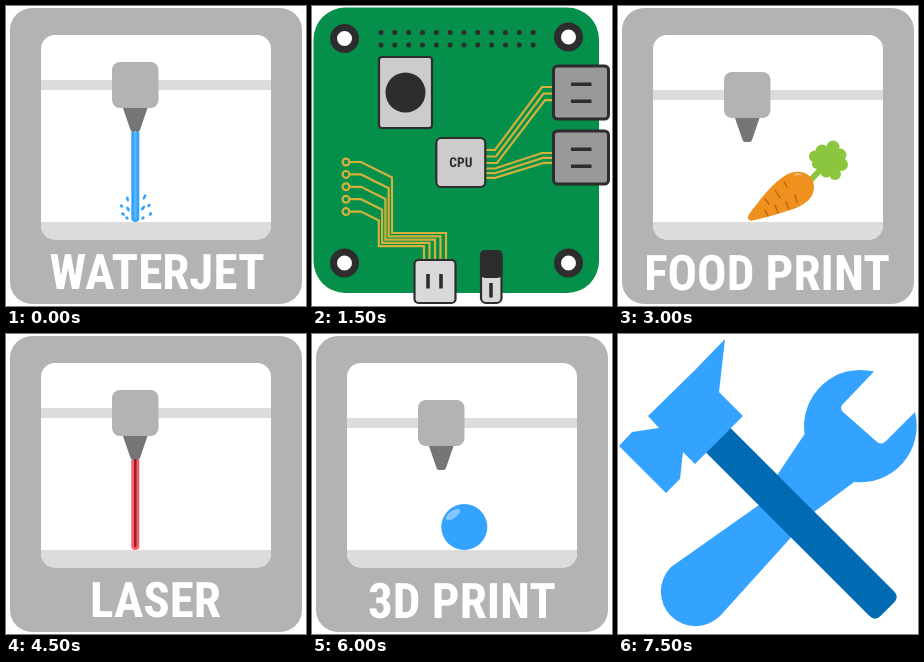
An HTML page that plays this animation: 300x300 px, repeating every 9 s.

```html
<!DOCTYPE html>
<html lang="en">
<head>
<meta charset="utf-8">
<title>Workshop signs</title>
<style>
  html, body { margin: 0; width: 100%; height: 100%; overflow: hidden; background: #fff; }
  svg { position: absolute; inset: 0; width: 100%; height: 100%; }
  .scene { visibility: hidden; }
  text {
    font-family: "Roboto Condensed", Roboto, sans-serif;
    font-stretch: 75%;
    font-weight: 700;
    text-anchor: middle;
    text-rendering: geometricPrecision;
  }
  .label { font-size: 49px; fill: #fff; }
  .trace { fill: none; stroke: #d4b13a; stroke-width: 2.2; }
  .part { stroke: #2d2d2d; stroke-width: 2.2; }
  .slot { fill: none; stroke: #2d2d2d; stroke-width: 3.6; }
</style>
</head>
<body>
<svg id="stage" viewBox="0 0 300 300"></svg>
<script>
const HOLD = 1500;
const BLUE = '#33a3ff';

const rect = (x, y, w, h, r, fill, extra = '') =>
  `<rect x="${x}" y="${y}" width="${w}" height="${h}" rx="${r}" fill="${fill}" ${extra}/>`;
const circle = (x, y, r, fill, extra = '') =>
  `<circle cx="${x}" cy="${y}" r="${r}" fill="${fill}" ${extra}/>`;
const path = (d, fill, extra = '') => `<path d="${d}" fill="${fill}" ${extra}/>`;
const line = (d, cls) => `<path d="${d}" class="${cls}"/>`;

// Machine sign: frame, gantry at the given height, bed, work piece and caption.
function machine(caption, textX, textY, railY, work) {
  const headY = railY - 18;
  const noseY = headY + 46;
  return rect(4, 2, 292, 296, 22, '#b3b3b3') +
    rect(35, 29, 230, 204.5, 14, '#fff') +
    rect(35, railY, 230, 10, 0, '#dcdcdc') +
    path('M35 216H265V219.5A14 14 0 0 1 251 233.5H49A14 14 0 0 1 35 219.5Z', '#dcdcdc') +
    path(`M117 ${noseY}H141.5L134 ${noseY + 22}Q133.3 ${noseY + 24} 131.5 ${noseY + 24}H127` +
      `Q125.2 ${noseY + 24} 124.5 ${noseY + 22}Z`, '#757575') +
    rect(106, headY, 46.5, 46, 8, '#b3b3b3') +
    work +
    `<text class="label" x="${textX}" y="${textY}">${caption}</text>`;
}

const beam = (outer, inner) =>
  path('M125.3 126H133.3V212A4 4 0 0 1 125.3 212Z', outer) +
  path('M129.3 126V212', 'none', `stroke="${inner}" stroke-width="2.4" stroke-linecap="round"`);

function splash() {
  const drops = [
    [121, 212, 35, 1.8], [117, 208, 35, 2], [115.5, 200, 50, 1.8], [122, 203, 60, 2.6], [121.5, 193, 75, 2.6],
    [137, 212, -35, 1.8], [144.5, 208, -60, 2], [143, 199.5, -35, 1.8], [137, 202, -50, 2.8], [138.5, 191, -65, 2.8]
  ];
  return drops.map(([x, y, turn, r]) =>
    `<ellipse rx="${r}" ry="1.4" fill="${BLUE}" transform="translate(${x} ${y}) rotate(${turn})"/>`).join('');
}

function carrot() {
  const leaves = [[204, 145, 6.5], [215, 141, 6.5], [222, 149, 6.5], [223.5, 158.5, 6.5],
    [217, 168, 6], [208, 166, 5.5], [197, 150.5, 6], [199, 158, 5], [211, 155, 13]];
  const creases = 'M166 176l3 5M157 184l5 8M147 193l4 5M177 189l2 7M168 196l3 7M157 199l3 8M147 204l3 6';
  return path('M190 177L203 163', 'none', 'stroke="#8cc63f" stroke-width="6"') +
    leaves.map(([x, y, r]) => circle(x, y, r, '#8cc63f')).join('') +
    path('M130.500 209C141 195 154 177 168 169C181 162 196 167 196 181C196 194 183 201 172 204' +
      'C160 208 147 212 135 214.5C131 215.3 129 213 130.500 209Z', '#ef911f') +
    path(creases, 'none', 'stroke="#bd6412" stroke-width="1.4" stroke-linecap="round"') +
    path('M177 169Q180 167 183 169', 'none', 'stroke="#f8bd7c" stroke-width="1.6" stroke-linecap="round"');
}

const ball = () =>
  circle(152.3, 193, 23, BLUE) +
  '<ellipse rx="8.5" ry="3.6" fill="#85c7ff" transform="translate(141 180.5) rotate(-36)"/>';

function board() {
  const dark = '#2d2d2d';
  let out = rect(1.5, 1.5, 285.5, 285.5, 32, '#048f4b');

  for (const [x, y] of [[32.5, 32.5], [256.5, 31], [32.5, 257], [256.5, 257]])
    out += circle(x, y, 11, '#fff', `stroke="${dark}" stroke-width="7"`);
  for (let i = 0; i < 12; i++)
    for (const y of [26.5, 39]) out += circle(69 + i * 13.83, y, 2.5, dark);

  // Five bent traces from the pads down to the lower port.
  for (let i = 0; i < 5; i++) {
    const y = 156 + i * 12.4, x = 80 - i * 3.3;
    out += circle(34, y, 3.4, 'none', 'class="trace"') +
      line(`M37.5 ${y}H49L${x} ${y + (x - 49) / 2}V${227 + i * 3.3}H${134 - i * 5.5}V256`, 'trace');
  }
  for (let i = 0; i < 3; i++)
    out += line(`M172 ${144 + i * 6.5}H${183 + i}L${230 + i * 1.5} ${81 + i * 6.6}H243`, 'trace') +
      line(`M172 ${162.5 + i * 4.7}H183L${230 + i} ${147 + i * 4.9}H243`, 'trace');

  out += rect(67, 51, 53, 71, 3, '#ccc', 'class="part"') + circle(93.5, 86.5, 20, dark) +
    rect(124.3, 132, 49, 49, 5, '#ccc', 'class="part"') +
    `<text x="148.8" y="161.3" font-size="13.5" fill="${dark}">CPU</text>`;
  for (const y of [60, 125])
    out += rect(241.5, y, 55, 53, 4, '#999', 'class="part" style="stroke-width:3"') +
      line(`M259 ${y + 18.3}H279.5M259 ${y + 35.3}H279.5`, 'slot');
  return out + rect(102.5, 254, 41, 43, 4, '#d9d9d9', 'class="part"') +
    line('M116 268V282.5M129 268V282.5', 'slot') +
    rect(169, 245, 20.5, 52, 5, '#d9d9d9', 'class="part"') +
    rect(168, 244, 22.5, 28, 5, dark) +
    line('M179 277V291.5', 'slot');
}

const tools = () =>
  path('M256 37.5A56.5 56.5 0 0 0 186.6 100L160 140L141 171L53 233A34.5 34.5 0 0 0 102 282L196 178L236 148' +
    'A56.5 56.5 0 0 0 297 78L268 107Q263 112 258 107L225 78Q221 74 225 70Z', BLUE) +
  path('M87.5 118L112 93.5L276 257.3Q281.5 263 276 268.6L262.5 282Q257 287.5 251.5 282Z', '#006bb3') +
  path('M107 5L101 58L125 82L77 130L65 118L62 145L48 159L1 112L14 98L41 94L30 82L77 36Z', BLUE);

const scenes = [
  machine('WATERJET', 151, 283, 74, beam(BLUE, '#5cb6ff') + splash()),
  board(),
  machine('FOOD PRINT', 149, 284, 84, carrot()),
  machine('LASER', 149.5, 283, 74, beam('#ff5a67', '#8c1f2c')),
  machine('3D PRINT', 150, 284, 84, ball()),
  tools()
];

const stage = document.getElementById('stage');
stage.innerHTML = scenes.map(s => `<g class="scene">${rect(0, 0, 300, 300, 0, '#fff')}${s}</g>`).join('');

const loop = HOLD * scenes.length;
[...stage.children].forEach((scene, i) => scene.animate([
  { visibility: 'visible', offset: 0, easing: 'steps(1)' },
  { visibility: 'hidden', offset: 1 / scenes.length },
  { visibility: 'hidden', offset: 1 }
], { duration: loop, delay: i * HOLD - loop, iterations: Infinity }));
</script>
</body>
</html>
```
